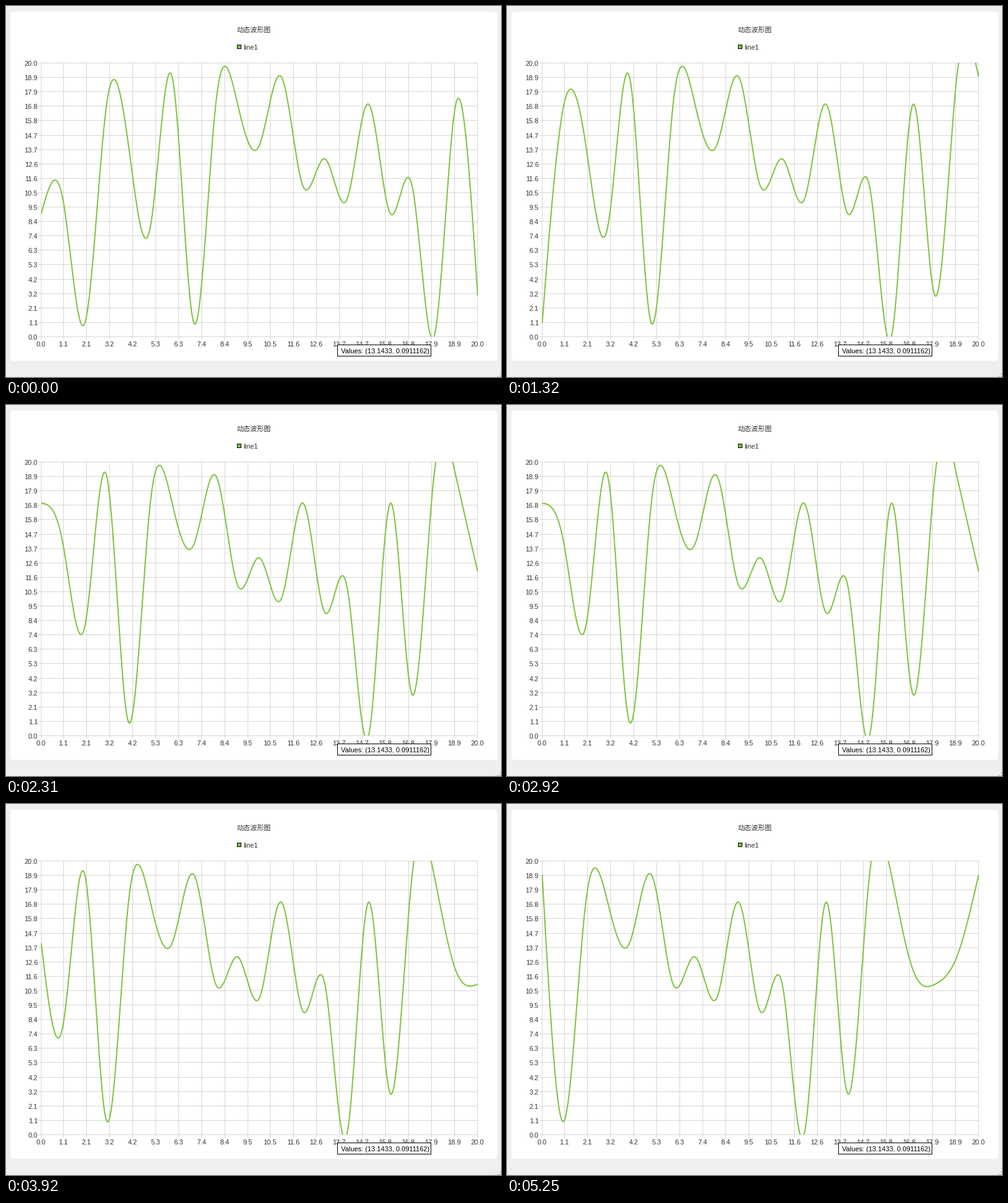
These frames come from a looping animation (795x595 px, 5.67 s). A matplotlib script:

```python
import numpy as np
import matplotlib.pyplot as plt
from matplotlib.animation import FuncAnimation
from matplotlib.patches import FancyBboxPatch, Rectangle

W, H, DPI = 795, 595, 64
PX = 72 / DPI  # points per pixel
TICK_MS = 30

LEFT, TOP, RIGHT, BOTTOM = 56, 91, 757, 530
SPAN, INTERVALS = 20, 19

GREEN, GRID, INK = "#80c342", "#d7d6d5", "#35322f"
LATIN, CJK = "Liberation Sans", "Noto Sans CJK JP"

SAMPLES = np.array([9, 10, 1, 17, 14, 8, 19, 1, 17, 17, 14, 19, 11, 13,
                    10, 17, 9, 11, 0, 17, 3, 19, 19, 12, 11, 13, 19], float)
HOLDS_MS = [330, 990, 990, 1020, 990, 930, 420]
ENDS_MS = np.cumsum(HOLDS_MS)

fig = plt.figure(figsize=(W / DPI, H / DPI), dpi=DPI, facecolor="#eef0f0")
ax = fig.add_axes([0, 0, 1, 1])
ax.set_xlim(0, W)
ax.set_ylim(H, 0)
ax.axis("off")


def box(x, y, w, h, color, z=1):
    return ax.add_patch(Rectangle((x, y), w, h, fc=color, lw=0,
                                  antialiased=False, zorder=z))


def framed(x, y, w, h, fill, z):
    box(x, y, w, h, "black", z)
    box(x + 1, y + 1, w - 2, h - 2, fill, z)


def label(x, y, text, ha="left", color=INK, font=LATIN, z=4, va="baseline"):
    return ax.text(x, y, text, ha=ha, va=va, color=color, family=font,
                   fontsize=11 * PX, zorder=z)


def natural_spline(y, per_segment=24):
    """Natural cubic spline through y at unit spacing."""
    n = len(y)
    system = np.eye(n)
    rhs = np.zeros(n)
    for i in range(1, n - 1):
        system[i, i - 1:i + 2] = 1, 4, 1
        rhs[i] = 6 * (y[i - 1] - 2 * y[i] + y[i + 1])
    m = np.linalg.solve(system, rhs)
    x = np.linspace(0, n - 1, (n - 1) * per_segment + 1)
    k = np.minimum(x.astype(int), n - 2)
    b = x - k
    a = 1 - b
    return x, (a * y[k] + b * y[k + 1]
               + ((a**3 - a) * m[k] + (b**3 - b) * m[k + 1]) / 6)


def window_curve(start):
    x, y = natural_spline(SAMPLES[start:start + SPAN + 1])
    return (LEFT + 0.5 + x * (RIGHT - LEFT) / SPAN,
            BOTTOM + 0.5 - y * (BOTTOM - TOP) / SPAN)


# Chart panel
ax.add_patch(FancyBboxPatch((7, 9), 782, 560, fc="white", lw=0, zorder=0,
                            boxstyle="round,pad=0,rounding_size=5"))
label(397.5, 37.5, "动态波形图", ha="center", font=CJK, va="center_baseline")
framed(371, 62, 7, 7, GREEN, 3)
label(381, 70, "line1")

# Grid, ticks and axis labels
for k in range(INTERVALS + 1):
    gx = int(LEFT + k * (RIGHT - LEFT) / INTERVALS)
    gy = round(BOTTOM - k * (BOTTOM - TOP) / INTERVALS)
    box(gx, TOP, 1, BOTTOM - TOP + 5, GRID)
    box(LEFT - 4, gy, RIGHT - LEFT + 5, 1, GRID)
    text = f"{SPAN * k / INTERVALS:.1f}"
    label(gx, 546, text, ha="center")
    label(51, gy + 5, text, ha="right")

# Tooltip, its text cut at the right edge
framed(532, 543, 151, 19, "white", 5)
tip = label(538, 557, "Values: (13.1433, 0.0911162)", color="black", z=6)
tip.set_clip_path(Rectangle((533, 544), 147.5, 17, transform=ax.transData))

# Size grip
for x, y in [(793, 589), (793, 593), (789, 593)]:
    box(x, y, 2, 2, "#bfbfbf")

curves = [window_curve(s) for s in range(len(HOLDS_MS))]
line, = ax.plot([], [], color=GREEN, lw=2 * PX, zorder=3,
                solid_joinstyle="round", solid_capstyle="butt")
line.set_clip_path(Rectangle((LEFT, TOP), RIGHT - LEFT + 1, BOTTOM - TOP,
                             transform=ax.transData))


def update(i):
    step = np.searchsorted(ENDS_MS, i * TICK_MS, side="right")
    line.set_data(*curves[step])
    return line,


anim = FuncAnimation(fig, update, frames=int(ENDS_MS[-1]) // TICK_MS,
                     interval=TICK_MS, repeat=True, repeat_delay=0)
plt.show()
```
